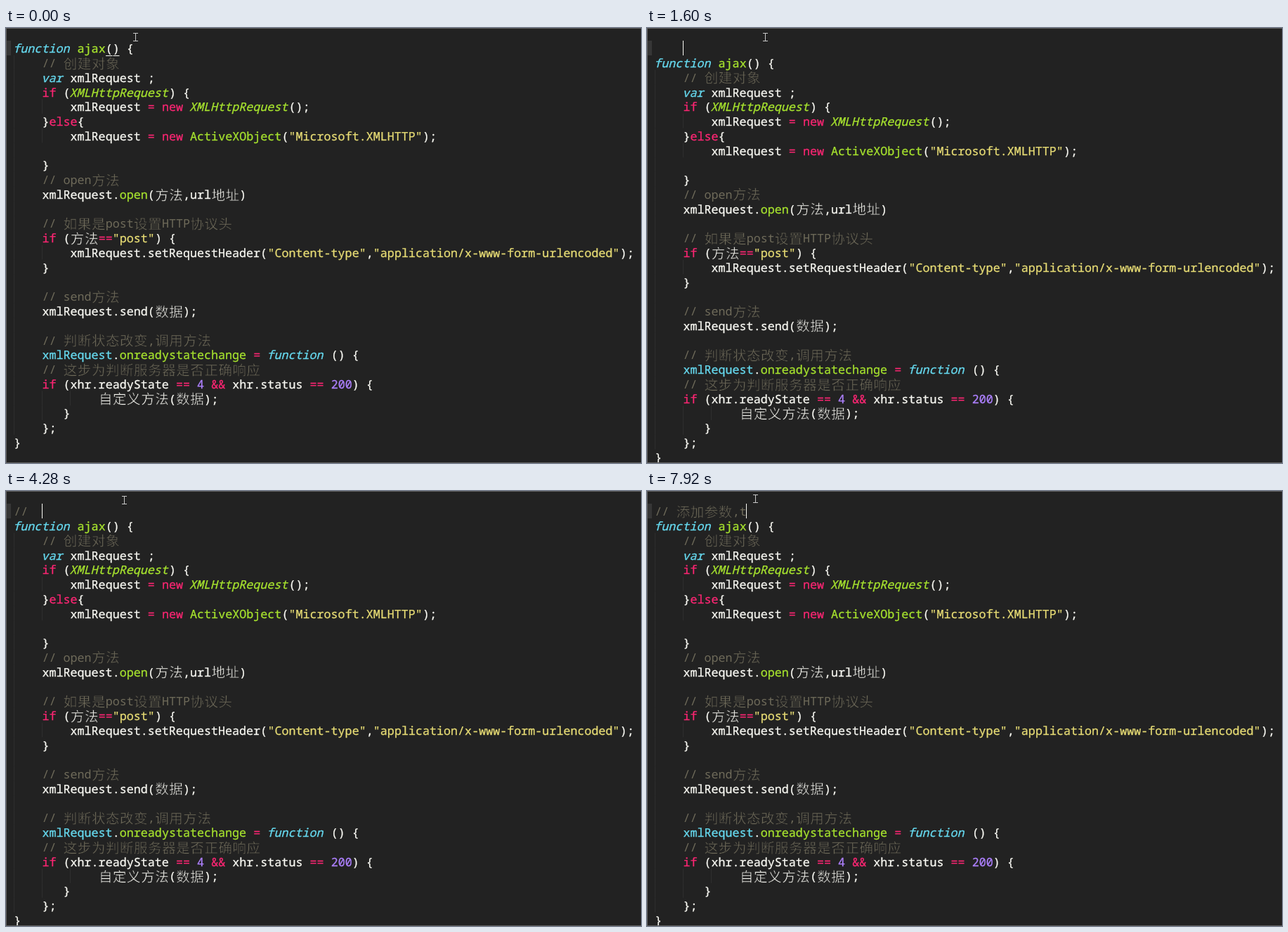
These frames come from a looping animation (904 by 619 pixels, 8 s). An HTML page:

```html
<!DOCTYPE html>
<html lang="zh-CN">
<head>
<meta charset="utf-8">
<title>Code editor</title>
<style>
  html, body { margin: 0; width: 100%; height: 100%; overflow: hidden; background: #222; }
  svg { display: block; width: 904px; height: 619px; }
  text {
    font: 16.72px "Noto Sans Mono", monospace; text-rendering: geometricPrecision; white-space: pre;
    fill: var(--ink); stroke: var(--ink); stroke-width: .3px;
  }
  .w { --ink: #f8f8f2; }
  .c { --ink: #6f6b5a; stroke: none; }
  .p { --ink: #f92672; }
  .b, .B { --ink: #66d9ef; }
  .g, .G { --ink: #a6e22e; }
  .y { --ink: #e6db74; }
  .v { --ink: #ae81ff; }
  .B, .G { font-style: italic; }
  /* A background-coloured outline thins the strokes. */
  .cjk { font: 300 19.5px "Noto Sans CJK SC", "Noto Sans CJK", sans-serif; stroke: #222; stroke-width: .5px; }
</style>
</head>
<body>
<svg viewBox="0 0 904 619">
  <rect width="904" height="619" fill="#222"/>
  <rect id="gutter" x="1" width="6" height="21" fill="#363636"/>
  <g id="code"></g>
  <g id="typed"></g>
  <path id="brackets" d="M142 39.5h9.5m1 0h9" stroke="#f8f8f2"/>
  <rect id="caret" width="1" height="21" fill="#f8f8f2"/>
  <path id="mouse" d="M-3 -5H4M.5 -5V6M-3 6H4" fill="none" stroke="#c8c8c8"/>
  <path d="M0 .5H904M.5 0V619M0 618.5H904" stroke="#5c5c5c"/>
</svg>
<script>
const DURATION = 8000, CELL = 10.03, LINE = 20.77, LEFT = 11.3, TOP = 18, BASE = 35.2;
const $ = id => document.getElementById(id);

// Each line: indent, then runs split by "|", each led by its colour class.
const lines = [
  [0, 'Bfunction|g ajax|w() {'],
  [4, 'c// 创建对象'],
  [4, 'Bvar|w xmlRequest ;'],
  [4, 'pif|w (|GXMLHttpRequest|w) {'],
  [8, 'wxmlRequest|p = new |GXMLHttpRequest|w();'],
  [4, 'w}|pelse|w{'],
  [8, 'wxmlRequest|p = new |gActiveXObject|w(|y"Microsoft.XMLHTTP"|w);'],
  [4, ''],
  [4, 'w}'],
  [4, 'c// open方法'],
  [4, 'wxmlRequest.|gopen|w(方法,url地址)'],
  [4, ''],
  [4, 'c// 如果是post设置HTTP协议头'],
  [4, 'pif|w (方法|p==|y"post"|w) {'],
  [8, 'wxmlRequest.setRequestHeader(|y"Content-type"|w,|y"application/x-www-form-urlencoded"|w);'],
  [4, 'w}'],
  [4, ''],
  [4, 'c// send方法'],
  [4, 'wxmlRequest.send(数据);'],
  [4, ''],
  [4, 'c// 判断状态改变,调用方法'],
  [4, 'bxmlRequest|w.|gonreadystatechange|p = |Bfunction|w () {'],
  [4, 'c// 这步为判断服务器是否正确响应'],
  [4, 'pif|w (xhr.readyState|p == |v4|p && |wxhr.status|p == |v200|w) {'],
  [12, 'w自定义方法(数据);'],
  [7, 'w}'],
  [4, 'w};'],
  [0, 'w}']
];

// Time, typed runs, caret column, caret opacity.
const edits = [
  [0, '', 14, 0], [1060, '', 4, 1], [1210, '', 4, .5], [1450, '', 4, 0],
  [1600, '', 4, 1], [1750, '', 5, 1], [2030, '', 6, 1], [2300, '', 5, 1],
  [2580, '', 4, 1], [3000, '', 0, 1], [3400, 'p/', 1, 1], [3650, 'c//', 2, 1],
  [3770, 'c//', 3, 1], [4160, 'c//', 4, 1], [4430, 'c//', 3, 1],
  [4980, 'c//', 3, 0], [5520, 'c//', 3, 1], [5670, 'c// 添加', 7, 1],
  [5940, 'c// 添加', 7, .5], [6070, 'c// 添加', 7, 0],
  [6470, 'c// 添加参数', 11, 1], [6840, 'c// 添加参数', 11, .4],
  [6960, 'c// 添加参数', 11, 0], [7380, 'c// 添加参数', 11, 1],
  [7920, 'c// 添加参数,t', 13, 1]
];

// Time, x, y of the pointer.
const moves = [
  [0, 184, 12], [140, 190, 12], [290, 202, 12], [440, 212, 12], [600, 206, 12],
  [750, 190, 12], [900, 174, 13], [1060, 168, 12], [6960, 167, 10],
  [7100, 162, 8], [7240, 157, 8], [7380, 155, 9], [7530, 154, 10]
];

const CLICK = 1060, NEWLINE = 1600;

function add(parent, tag, attrs, content = '') {
  const el = document.createElementNS('http://www.w3.org/2000/svg', tag);
  for (const key in attrs) el.setAttribute(key, attrs[key]);
  el.textContent = content;
  parent.appendChild(el);
}

// Places words on the character grid; a CJK character takes two cells.
function write(parent, col, row, runs) {
  const base = BASE + row * LINE;
  for (const run of runs.split('|')) {
    const style = run[0];
    const lean = 'BG'.includes(style) ? -1 : 0;
    for (const part of run.slice(1).match(/[\u2e80-\uffff]|[!-~]+|\s+/g) || []) {
      const wide = part > '\u2e80';
      const x = LEFT + col * CELL + (wide ? .3 : lean);
      const y = wide ? base + 1.6 : base;
      if (part.trim()) add(parent, 'text', { x, y, class: style + (wide ? ' cjk' : '') }, part);
      col += wide ? 2 : part.length;
    }
  }
}

function drawCode() {
  lines.forEach(([indent, runs], row) => {
    for (let col = 0; col < indent; col += 4) {
      const x = Math.floor(LEFT + col * CELL);
      add($('code'), 'rect', { x, y: TOP + row * LINE, width: 1, height: LINE, fill: '#2e2e2e' });
    }
    write($('code'), indent, row, runs);
  });
}

const at = (steps, t) => steps.filter(step => step[0] <= t).pop();

let shown = '';
function render(t) {
  const [, runs, col, opacity] = at(edits, t);
  const [, mx, my] = at(moves, t);
  const top = t >= CLICK && t < NEWLINE ? TOP - 21 : TOP;

  $('code').setAttribute('transform', `translate(0 ${t < NEWLINE ? 0 : LINE})`);
  $('gutter').setAttribute('y', top);
  $('brackets').setAttribute('visibility', t < CLICK ? 'visible' : 'hidden');
  $('caret').setAttribute('x', Math.floor(11 + col * CELL));
  $('caret').setAttribute('y', top);
  $('caret').setAttribute('opacity', opacity);
  $('mouse').setAttribute('transform', `translate(${mx} ${my + .5})`);

  if (runs !== shown) {
    $('typed').replaceChildren();
    write($('typed'), 0, 0, runs);
    shown = runs;
  }
}

drawCode();
const start = performance.now();
function tick() {
  render((performance.now() - start) % DURATION);
  requestAnimationFrame(tick);
}
tick();
</script>
</body>
</html>
```
